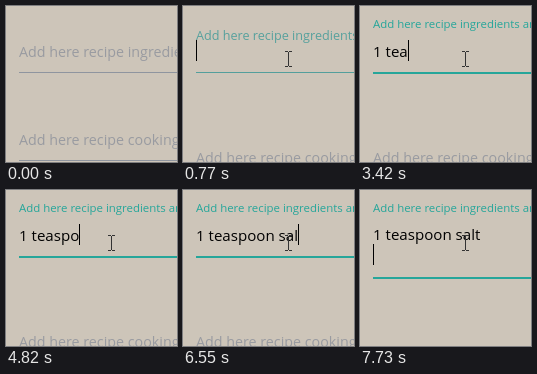
Recreate the animation shown at these times as an HTML page. Size 171 by 156 pixels, loop 8000 ms.

```html
<!DOCTYPE html>
<html lang="en">
<head>
<meta charset="utf-8">
<title>Recipe form</title>
<style>
  html, body { margin: 0; width: 100%; height: 100%; overflow: hidden; background: #cdc5b9; }
  svg { display: block; width: 171px; height: 156px; font: 14.29px "Open Sans", "Noto Sans", sans-serif; }
  .hint { fill: #999ba1; }
  .rule { fill: #8f959f; }
  #typed { font-size: 15.1px; white-space: pre; }
</style>
</head>
<body>
<svg viewBox="0 0 171 156">
  <text id="label">Add here recipe ingredients and amounts</text>
  <rect id="rule" x="13" width="158"/>
  <g id="next">
    <text class="hint" x="13" y="139">Add here recipe cooking steps</text>
    <rect class="rule" x="13" y="154" width="158" height="1"/>
  </g>
  <text id="typed" x="13" xml:space="preserve"></text>
  <rect id="caret" width="1" height="21"/>
  <path id="mouse" d="M-3 -7.5h3m1 0h3M.5 -7v14M-3 7.5h3m1 0h3" fill="none" stroke="#333"/>
</svg>
<script>
const LOOP = 8000, STEP = 77.5, BLINK = 544, LINE = 21;
const ENTER_POINTER = 150, FOCUS = 690, ENTER = 7580, GROW = 7730;
const PHRASE = '1 teaspoon salt';
// Letters come in pairs: the first at a beat, the second 42% of the way to the next
const BEATS = [2240, 2950, 3420, 4510, 4900, 5840, 6150, 7100];

const $ = id => document.getElementById(id);
const clamp = v => Math.min(1, Math.max(0, v));
const mix = (a, b, p) => a + (b - a) * p;
const easeOut = p => 1 - (1 - p) ** 2;
const tint = (from, p) => `color-mix(in srgb, #26a69a ${p * 100}%, ${from})`;

const keyTimes = BEATS.flatMap((beat, i) =>
  i < BEATS.length - 1 ? [beat, mix(beat, BEATS[i + 1], .42)] : [beat]);

function set(id, attrs) {
  for (const name in attrs) $(id).setAttribute(name, attrs[name]);
}
const show = (id, on) => set(id, { visibility: on ? 'visible' : 'hidden' });

function drawField(t, step) {
  const q = clamp((step - FOCUS) / 230), p = easeOut(q);
  const grow = t >= GROW ? LINE : 0;
  set('label', {
    transform: `translate(13 ${mix(51, 22, p)}) scale(${mix(1, .8, p)})`,
    style: `fill: ${tint('#999ba1', p)}`
  });
  set('rule', {
    y: 66 + grow, height: 1 + Math.round(q),
    style: `fill: ${tint('#8f959f', p)}`
  });
  set('next', { transform: `translate(0 ${(t >= FOCUS ? 18 : 0) + grow})` });
}

function drawTyping(t) {
  const entered = t >= ENTER;
  // The new line scrolls the text until the field has grown
  const scroll = t >= GROW ? -1 : entered ? -11 : 0;
  $('typed').textContent = PHRASE.slice(0, keyTimes.filter(k => k <= t).length);
  set('typed', { y: 51 + scroll });
  set('caret', {
    x: 13 + (entered ? 0 : Math.round($('typed').getComputedTextLength())),
    y: 34 + scroll + (entered ? LINE : 0)
  });
  // Each action restarts the blinking
  const last = [FOCUS, ...keyTimes, ENTER].findLast(k => k <= t);
  show('caret', Math.floor((t - last) / BLINK) % 2 === 0);
}

function drawMouse(t, step) {
  const m = easeOut(clamp((step - ENTER_POINTER + STEP) / 540));
  set('mouse', { transform: `translate(${Math.round(mix(185, 105, m))} ${Math.round(mix(112, 53, m))})` });
  show('mouse', t >= ENTER_POINTER);
}

function draw(t) {
  // The pointer and the label move in coarse steps
  const step = ENTER_POINTER + Math.floor((t - ENTER_POINTER) / STEP) * STEP;
  drawField(t, step);
  drawTyping(t);
  drawMouse(t, step);
}

const start = performance.now();
function tick() {
  draw((performance.now() - start) % LOOP);
  requestAnimationFrame(tick);
}
tick();
</script>
</body>
</html>
```
